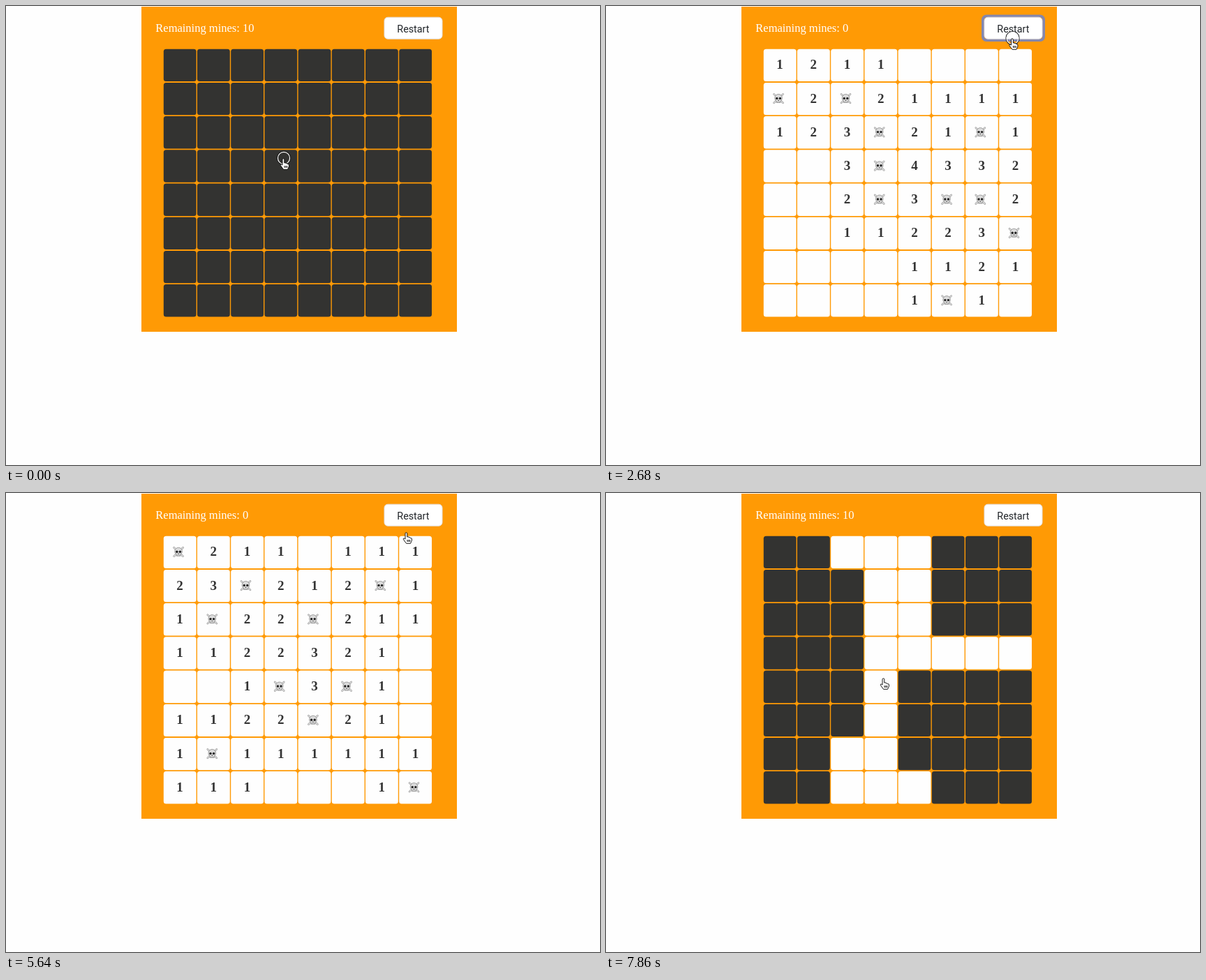
An HTML page for the animation above (8 s loop, 851 by 658 pixels).

```html
<!DOCTYPE html>
<html lang="en">
<head>
<meta charset="utf-8">
<title>Minesweeper</title>
<style>
  html, body { margin: 0; width: 100%; height: 100%; overflow: hidden; background: #fefefe; }
  svg { display: block; }
  text { font-family: Roboto, Inter, sans-serif; }
  .serif { font-family: "Liberation Serif", "Times New Roman", serif; }
  #board text { font: bold 19px "Liberation Serif", "Times New Roman", serif; fill: #333; text-anchor: middle; }
  #dialog { filter: drop-shadow(0 2px 3px rgba(0, 0, 0, .5)); }
</style>
</head>
<body>
<svg width="851" height="658" viewBox="0 0 851 658">
  <defs>
    <g id="skull">
      <path d="M-6.5-6L6.5 6.5M6.5-6L-6.5 6.5" stroke="#999" stroke-width="2.6" stroke-linecap="round"/>
      <path d="M-6.5-6L6.5 6.5M6.5-6L-6.5 6.5" stroke="#e4e4e4" stroke-width="1.3" stroke-linecap="round"/>
      <path d="M-3 3.4C-7 2-5.6-6 0-6S7 2 3 3.4V6H-3Z" fill="#dcdcdc" stroke="#8c8c8c" stroke-width=".8"/>
      <circle cx="-2.3" cy="0" r="1.7" fill="#222"/>
      <circle cx="2.3" cy="0" r="1.7" fill="#222"/>
      <path d="M0 2l-.8 1.5H.8ZM-1.2 4.6V6M1.2 4.6V6" fill="#333" stroke="#777" stroke-width=".5"/>
    </g>
  </defs>
  <rect x="194" y="1" width="452" height="466" fill="#ff9a05"/>
  <text id="count" class="serif" x="214.3" y="36.7" font-size="16.5" fill="#fff"></text>
  <rect id="focus" x="540" y="14.5" width="87" height="34.5" rx="5" fill="none" stroke="#8487ad" stroke-width="4"/>
  <rect x="542" y="16.2" width="83" height="31" rx="5" fill="#fff" stroke="#e3dfe0"/>
  <text x="583.4" y="37.7" font-size="14.3" text-anchor="middle" fill="#212529">Restart</text>
  <g id="board"></g>
  <g id="dialog">
    <path d="M210.5-20H629.5V77.5a3 3 0 0 1-3 3H213.500a3 3 0 0 1-3-3Z" fill="#292a2d"/>
    <text x="226" y="16" font-size="12.2" fill="#9aa0a6">You lost! Click 'Restart' button to play again.</text>
    <rect id="ok" x="554" y="35.500" width="60" height="30" rx="4"/>
    <text x="583.5" y="54.500" font-size="12" text-anchor="middle" fill="#202124">OK</text>
  </g>
  <g id="cursor">
    <g id="ring" fill="none" stroke-width="1.2">
      <circle r="9.5" stroke="#111"/>
      <circle r="8.6" stroke="#fff"/>
    </g>
    <path id="arrow" d="M0 0V15l3.400-3.200 2.300 5 2.200-1-2.200-4.900H10.500Z" fill="#000" stroke="#fff"/>
    <g id="hand" stroke="#000" stroke-width=".9" stroke-linejoin="round">
      <path d="M-2 10V2.200a1.400 1.400 0 0 1 2.800 0V7q2.200-1 2.400.8q2-.6 2.200.9q2-.4 2 1.200V12L5.500 16.300H-.5L-4.600 10.600q-.6-2 1-1.600Z" fill="#fff"/>
      <path d="M1 11v3M2.800 11v3M4.600 11v3"/>
    </g>
  </g>
</svg>
<script>
const LOOP = 8000, TICK = 148.3;
const $ = id => document.getElementById(id);

// '#' is covered, '*' a mine, ' ' an empty open cell
const covered = Array(8).fill('########');
const gameA = ['1211    ', '*2*21111', '123*21*1', '  3*4332', '  2*3**2', '  11223*', '    1121', '    1*1 '];
const gameB = ['*211 111', '23*212*1', '1*22*211', '1122321 ', '  1*3*1 ', '1122*21 ', '1*111111', '111   1*'];
const gameC = ['##   ###', '###  ###', '###  ###', '###     ', '### ####', '### ####', '##  ####', '##   ###'];
const firstMove = covered.map((row, y) => y === 3 ? '##2#####' : row);

// Start tick and board
const boards = [[0, covered], [4, gameA], [19, covered], [24, firstMove], [27, gameB], [46, covered], [53, gameC]];

// Pointer stops: tick, x, y
const path = [
  [0, 398, 218], [5, 398, 218], [6, 400, 232], [8, 400, 232], [13, 572.5, 54.5], [14, 573, 54],
  [16, 582.5, 46], [19, 582.5, 46], [23, 350, 228], [24, 350, 228], [25, 409, 272], [27, 409, 272],
  [28, 449, 281], [29, 449, 281], [32, 583, 65], [35, 580, 62], [37, 574, 56], [38, 574, 56],
  [41, 520, 272], [45, 574, 54], [46, 574, 54], [49, 398, 265], [54, 398, 265]
];
const clicks = [0, 13, 18, 23, 27, 37, 45, 52];

const within = (n, ...spans) => spans.some(([from, to]) => n >= from && n <= to);
const show = (id, on) => $(id).setAttribute('visibility', on ? 'visible' : 'hidden');

function cell(ch, col, row) {
  const x = 225.8 + col * 48.2, y = 61.7 + row * 48.2;
  const box = `<rect x="${x}" y="${y}" width="46.8" height="46.4" rx="3.5" fill="${ch === '#' ? '#333331' : '#fefefe'}"/>`;
  if (ch === '*') return box + `<use href="#skull" x="${x + 21.3}" y="${y + 22.5}"/>`;
  return /\d/.test(ch) ? box + `<text x="${x + 23.3}" y="${y + 28.7}">${ch}</text>` : box;
}

function pointer(n) {
  const i = path.findIndex(stop => stop[0] > n);
  const [t0, x0, y0] = path[i - 1], [t1, x1, y1] = path[i];
  const k = (n - t0) / (t1 - t0);
  return [x0 + (x1 - x0) * k, y0 + (y1 - y0) * k];
}

let drawnBoard;
function draw(n) {
  const board = boards.filter(([start]) => start <= n).pop()[1];
  if (board !== drawnBoard) {
    $('board').innerHTML = board.map((line, row) => [...line].map((ch, col) => cell(ch, col, row)).join('')).join('');
    $('count').textContent = 'Remaining mines: ' + (board === gameA || board === gameB ? 0 : 10);
    drawnBoard = board;
  }
  const click = clicks.includes(n), arrow = within(n, [6, 13], [28, 37]);
  show('focus', within(n, [18, 22], [45, 51]));
  show('dialog', within(n, [5, 13], [28, 37]));
  show('ring', click);
  show('arrow', arrow);
  show('hand', !arrow);
  $('ok').setAttribute('fill', click ? '#86abec' : '#8ab4f8');
  $('cursor').setAttribute('transform', `translate(${pointer(n)})`);
}

let lastTick = -1;
function frame() {
  const n = Math.floor((performance.now() % LOOP + 8) / TICK);
  if (n !== lastTick) draw(lastTick = n);
  requestAnimationFrame(frame);
}
frame();
</script>
</body>
</html>
```
